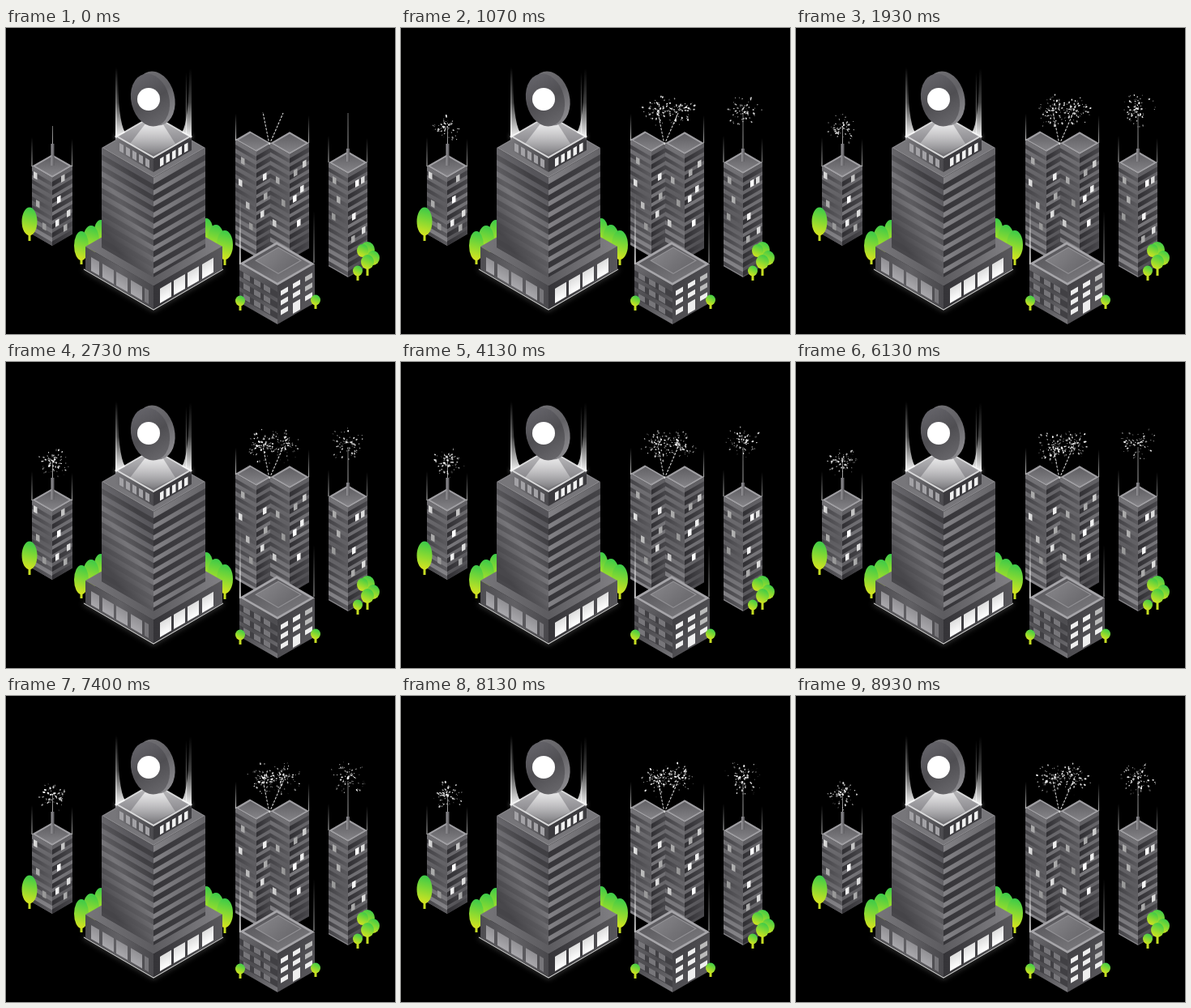
An HTML page with a canvas that plays this animation: 480 by 378 pixels, repeating every 8.99 s.

```html
<!DOCTYPE html>
<html lang="en">
<head>
<meta charset="utf-8">
<title>Night city</title>
<style>
  html, body { margin: 0; width: 100%; height: 100%; overflow: hidden; background: #000; }
  canvas { display: block; width: 100vw; height: 100vh; }
</style>
</head>
<body>
<canvas id="stage" width="480" height="378"></canvas>
<script>
const W = 480, H = 378, LOOP = 8990, STEPS = 135, ISO = 0.577;
const view = document.getElementById('stage').getContext('2d');
const city = document.createElement('canvas');
city.width = W;
city.height = H;
const c = city.getContext('2d');

const random = n => {
  const v = Math.sin(n * 127.1 + 11.7) * 43758.5453;
  return v - Math.floor(v);
};

function blend(x0, y0, x1, y1, ...colors) {
  const g = c.createLinearGradient(x0, y0, x1, y1);
  colors.forEach((color, i) => g.addColorStop(i / (colors.length - 1), color));
  return g;
}

function poly(fill, ...points) {
  c.beginPath();
  points.forEach(([x, y]) => c.lineTo(x, y));
  c.closePath();
  c.fillStyle = fill;
  c.fill();
}

function line(color, width, ...points) {
  c.beginPath();
  points.forEach(([x, y]) => c.lineTo(x, y));
  c.strokeStyle = color;
  c.lineWidth = width;
  c.stroke();
}

function oval(fill, x, y, rx, ry, turn = 0) {
  c.beginPath();
  c.ellipse(x, y, rx, ry, turn, 0, Math.PI * 2);
  c.fillStyle = fill;
  c.fill();
}

// Runs draw() with the x axis sheared along an isometric wall that starts at (x, y).
function onWall(x, y, slope, draw) {
  c.save();
  c.transform(1, slope, 0, 1, x, y);
  draw();
  c.restore();
}

function rect(fill, x, y, w, h) {
  c.fillStyle = fill;
  c.fillRect(x, y, w, h);
}

function bands(w, h, base, stripe, pitch, thick, first) {
  rect(base, 0, 0, w, h);
  for (let y = first; y < h; y += pitch) rect(stripe, 0, y, w, Math.min(thick, h - y));
}

// Flat roof described by its front corner and the run of each wall.
function roof(x, y, left, right, fill, rim, inset) {
  const corners = k => {
    const l = left * k, r = right * k;
    const cx = x + (right - left) / 2, cy = y - (left + right) * ISO / 2;
    const dx = (r - l) / 2, dy = (l + r) * ISO / 2;
    return [[cx - dx, cy + dy], [cx - dx + r, cy + dy - r * ISO],
      [cx + dx, cy - dy], [cx - dx - l, cy + dy - l * ISO]];
  };
  poly(rim, ...corners(1));
  poly(fill, ...corners(inset));
}

function beam(x, top, bottom, width, alpha) {
  rect(blend(0, top, 0, bottom, 'rgba(255,255,255,0)', `rgba(255,255,255,${alpha})`),
    x - width / 2, top, width, bottom - top);
}

function tree(x, y, rx, ry, trunk) {
  if (trunk) {
    line('#c5dc22', 3, [x, y], [x, trunk]);
  }
  oval(blend(x + rx / 2, y - ry, x - rx / 2, y + ry, '#35c94b', '#86d932', '#dce51f'), x, y, rx, ry);
}

// Slim tower: front corner (x, y), wall runs and heights, lit windows as [x, y, shade].
function tower(x, y, left, right, h, windows) {
  onWall(x - left, y - left * ISO, ISO, () =>
    bands(left, h, blend(0, 0, left, h, '#747377', '#5b5a5e', '#8a898d'),
      blend(0, 0, left, 0, '#444347', '#5d5c60'), 10.5, 5, 6));
  onWall(x, y, -ISO, () =>
    bands(right, h, blend(0, 0, right, h, '#5f5e62', '#77767a', '#4a494d'),
      blend(0, 0, right, 0, '#302f33', '#49484c'), 10.5, 6, 5));
  for (const [wx, wy, shade] of windows) {
    onWall(wx, wy, wx < x ? ISO : -ISO, () => rect(shade, 0, 0, 4.5, 8));
  }
  roof(x, y, left, right, blend(x, y - 28, x, y, '#5b5a5e', '#88878b'), '#a09fa3', 0.83);
}

function antenna(x, top, neck, foot) {
  line(blend(0, top, 0, neck, '#777', '#bbb'), 0.9, [x, top], [x, neck]);
  rect(blend(x - 2, 0, x + 2, 0, '#98979b', '#5a595d'), x - 2, neck, 4, foot - neck);
}

function drawSideTowers() {
  tower(57, 185, 25, 25, 84, [
    [34, 177, '#d5d5d5'], [37, 212, '#aaa'], [45, 240, '#999'], [63, 209, '#fff'],
    [68, 183, '#c4c4c4'], [75, 226, '#ddd'], [61, 238, '#eee'], [71, 244, '#aaa']]);
  beam(32, 135, 171, 1.2, 0.65);
  beam(81.5, 137, 171, 1.2, 0.6);
  antenna(57.5, 121, 143, 170);

  tower(422, 180, 24, 24, 128, [
    [403, 183, '#aaa'], [402, 228, '#999'], [408, 207, '#b0b0b0'], [431, 189, '#fff'],
    [438, 185, '#ddd'], [427, 230, '#f4f4f4'], [439, 247, '#ddd'], [426, 258, '#aaa']]);
  beam(398, 133, 166, 1.2, 0.65);
  beam(445.5, 136, 166, 1.2, 0.5);
  antenna(422, 105, 149, 165);
}

function drawTwinTowers() {
  tower(309, 153, 26, 18, 130, [
    [287, 186, '#ddd'], [290, 159, '#aaa'], [296, 214, '#bbb'], [300, 240, '#999'],
    [317, 181, '#eee'], [314, 227, '#ddd'], [318, 205, '#aaa']]);
  tower(350, 156, 24, 24, 130, [
    [329, 236, '#ccc'], [333, 183, '#aaa'], [340, 211, '#999'], [354, 208, '#fff'],
    [363, 196, '#eee'], [359, 238, '#fff'], [366, 165, '#ccc'], [355, 176, '#aaa']]);
  beam(283.5, 106, 139, 1.2, 0.75);
  beam(373.5, 108, 142, 1.2, 0.65);
  c.setLineDash([3, 1.5]);
  line('#c9c9c9', 1.1, [325, 144], [317, 104]);
  line('#d8d8d8', 1.1, [325, 144], [342, 105]);
  c.setLineDash([]);
  beam(289, 205, 292, 2, 0.6);
  beam(380, 226, 290, 1.4, 0.5);
}

function drawLowBlock() {
  onWall(288, 291, ISO, () => {
    rect(blend(0, 0, 47, 48, '#6e6d71', '#4d4c50', '#77767a'), 0, 0, 47, 48);
    for (let row = 0; row < 3; row++) {
      rect('#414044', 0, 8 + row * 13, 47, 8);
      for (const x of [5, 18, 30]) rect('#77767a', x, 8 + row * 13, 8, 7);
    }
  });
  onWall(335, 318, -ISO, () => {
    rect(blend(0, 0, 46, 48, '#414044', '#59585c'), 0, 0, 46, 48);
    for (let row = 0; row < 3; row++) {
      for (const x of [4, 19, 34]) {
        const door = row === 2 && x === 19;
        rect(row === 2 || x < 30 ? '#eee' : '#bbb', x, 9 + row * 12, 9, door ? 13 : 6);
      }
    }
  });
  roof(335, 318, 47, 46, blend(320, 268, 340, 315, '#58575b', '#77767a'), '#a6a5a9', 0.88);
  roof(336, 304, 29, 29, blend(320, 270, 350, 303, '#858488', '#69686c'), '#929195', 0.92);
  beam(288.5, 245, 292, 1.4, 0.55);
  tree(289, 337, 6, 6.5, 349);
  tree(382, 336, 6, 6.5, 347);
}

function drawPodium() {
  c.save();
  c.shadowColor = '#fff';
  c.shadowBlur = 6;
  line('rgba(255,255,255,.75)', 1.2, [96, 298], [182, 348], [268, 298]);
  c.restore();
  poly(blend(98, 270, 267, 270, '#77767a', '#5d5c60', '#818084'),
    [98, 270], [182, 222], [267, 270], [182, 319]);
  onWall(98, 270, ISO, () => {
    rect(blend(0, 0, 84, 0, '#4e4d51', '#626165', '#49484c'), 0, 0, 84, 28.5);
    const glass = blend(0, 8, 0, 26, '#8f8e92', '#aaa9ad');
    for (const x of [7, 21, 38, 56]) rect(glass, x, 9, x === 7 ? 10 : 14, 17);
    rect('#77767a', 73, 9, 5, 17);
  });
  onWall(182, 318.5, -ISO, () => {
    rect(blend(0, 0, 85, 0, '#343337', '#59585c'), 0, 0, 85, 28.5);
    for (const x of [8, 25, 42, 60]) rect(blend(0, 8, 0, 26, '#ddd', '#fff'), x, 8, 14, 18);
  });
}

function drawMainTower() {
  onWall(118, 148, ISO, () => {
    bands(64, 123, blend(0, 100, 64, 20, '#454448', '#77767a', '#56555a'),
      blend(0, 90, 64, 40, '#48474b', '#5e5d61', '#403f43'), 13.8, 7, 8);
  });
  onWall(182, 185, -ISO, () => {
    bands(64, 123, blend(0, 0, 64, 0, '#828185', '#656468'),
      blend(0, 0, 64, 0, '#353438', '#454448'), 13.8, 7.5, 8);
  });
  roof(182, 185, 64, 64, '#77767a', '#88878b', 0.96);

  onWall(135, 134, ISO, () => {
    rect(blend(0, 0, 47, 0, '#77767a', '#4a494d'), 0, 0, 47, 17);
    for (let x = 5; x < 44; x += 8) rect('#a3a2a6', x, 5, 5, 10);
  });
  onWall(182, 161, -ISO, () => {
    rect('#3b3a3e', 0, 0, 47, 17);
    for (let x = 8; x < 44; x += 7.5) rect('#f0f0f0', x, 5, 4.5, 10);
  });
  roof(182, 161, 47, 47, blend(182, 108, 182, 159, '#c4c4c5', '#9a999d', '#706f73'), '#d8d8d9', 0.92);
  poly(blend(0, 112, 0, 156, 'rgba(255,255,255,.8)', 'rgba(255,255,255,.05)'),
    [176, 113], [190, 113], [209, 143], [182, 156], [153, 143]);
}

function drawLight() {
  const fade = blend(0, 50, 0, 134, 'rgba(255,255,255,0)', 'rgba(255,255,255,.25)', 'rgba(255,255,255,.95)');
  for (const [edge, inward] of [[135, 1], [229, -1]]) {
    c.beginPath();
    c.moveTo(edge + inward * 3, 50);
    c.quadraticCurveTo(edge + inward * 3, 115, edge + inward * 12, 129);
    c.lineTo(edge, 135);
    c.lineTo(edge, 50);
    c.fillStyle = fade;
    c.fill();
  }
  beam(136, 48, 134, 1.2, 0.8);
  beam(222.5, 55, 130, 1.4, 0.6);
  c.save();
  c.shadowColor = '#fff';
  c.shadowBlur = 5;
  oval('#fff', 136, 134, 1.5, 1.5);
  oval('#fff', 228, 134, 1.5, 1.5);
  c.restore();
}

function drawCoin() {
  oval(blend(155, 55, 210, 120, '#747377', '#626165', '#98979b'), 184, 87, 24, 34, -0.24);
  oval(blend(160, 60, 195, 120, '#65646a', '#4f4e52', '#69686c'), 178, 89, 23.5, 33, -0.24);
  oval('#fff', 176, 88, 14, 14);
}

function drawCity() {
  rect('#000', 0, 0, W, H);
  drawSideTowers();
  drawTwinTowers();
  drawLowBlock();
  tree(29, 239, 9.5, 17.5, 263);
  tree(117, 255, 9, 18);
  tree(105, 262, 10, 18);
  tree(93, 269, 9, 18, 292);
  tree(247, 253, 9, 18);
  tree(259, 261, 10, 18);
  tree(270, 268, 10, 18, 293);
  drawPodium();
  drawMainTower();
  drawLight();
  drawCoin();
  tree(446, 274, 9, 10, 306);
  tree(440, 275, 7, 8);
  tree(453, 284, 8, 9);
  tree(446, 289, 8, 9);
  tree(434, 300, 6, 6.5, 312);
}

const bursts = [
  { x: 58, y: 122, reach: 19, rate: 60 },
  { x: 318, y: 102, reach: 22, rate: 68 },
  { x: 343, y: 101, reach: 21, rate: 68 },
  { x: 422, y: 100, reach: 23, rate: 62 }
];

function drawSparks(ms) {
  const t = ms / 1000;
  const maxLife = 1.55;
  bursts.forEach(({ x, y, reach, rate }, b) => {
    const first = Math.max(0, Math.ceil((t - maxLife) * rate));
    for (let i = first; i < t * rate; i++) {
      const seed = b * 4000 + i * 5;
      const age = t - i / rate;
      const life = 0.9 + random(seed) * (maxLife - 0.9);
      if (age > life) continue;
      const angle = random(seed + 1) * Math.PI * 2;
      const far = reach * (0.25 + 0.85 * random(seed + 2)) * (1 - Math.exp(-3.2 * age));
      const size = 0.7 + 1.3 * random(seed + 3) ** 2;
      view.globalAlpha = Math.min(1, (life - age) * 3) * (0.6 + 0.4 * random(seed + 4));
      view.beginPath();
      view.ellipse(x + Math.cos(angle) * far, y + Math.sin(angle) * far * 0.92 + age * age * 1.5,
        size * 0.8, size * 0.55, angle, 0, Math.PI * 2);
      view.fill();
    }
  });
  view.globalAlpha = 1;
}

drawCity();
view.fillStyle = '#fff';
const start = performance.now();

function frame() {
  const elapsed = (performance.now() - start) % LOOP;
  const step = LOOP / STEPS;
  view.drawImage(city, 0, 0);
  drawSparks(Math.floor(elapsed / step) * step);
  requestAnimationFrame(frame);
}
frame();
</script>
</body>
</html>
```
